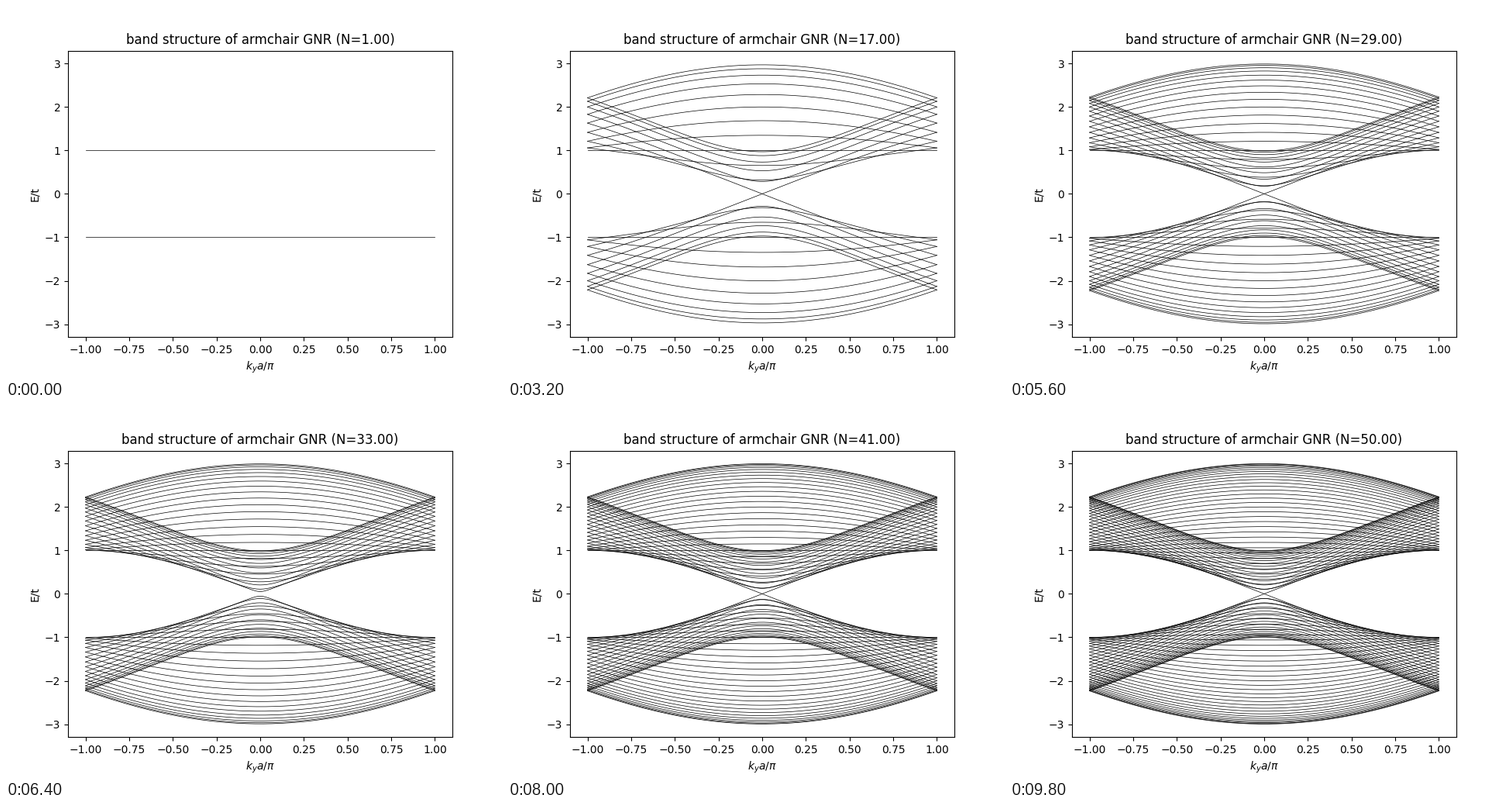
A matplotlib script for the animation above (10000 ms loop, 640 px wide and 480 px high).

```python
import numpy as np
import matplotlib.pyplot as plt
from matplotlib.animation import FuncAnimation

N_MAX = 50
INTERVAL = 200

k = np.linspace(-1, 1, 201)


def bands(n):
    """Positive energies of an armchair ribbon with n dimer lines, one row per band."""
    c = np.cos(np.arange(1, n + 1) * np.pi / (n + 1))[:, None]
    return np.sqrt(np.abs(1 + 4 * c * np.cos(np.pi * k / 2) + 4 * c**2))


fig, ax = plt.subplots(figsize=(6.4, 4.8), dpi=100)
e_lim = 1.1 * bands(N_MAX).max()
ax.set_xlim(-1.1, 1.1)
ax.set_ylim(-e_lim, e_lim)
ax.set_xlabel(r"$k_y a/\pi$")
ax.set_ylabel("E/t")
title = ax.set_title("")
lines = [ax.plot([], [], color="black", lw=0.5)[0] for _ in range(2 * N_MAX)]


def update(i):
    n = i + 1
    energy = bands(n)
    curves = np.concatenate([energy, -energy])
    for j, line in enumerate(lines):
        line.set_visible(j < 2 * n)
        if j < 2 * n:
            line.set_data(k, curves[j])
    title.set_text(f"band structure of armchair GNR (N={n:.2f})")
    return [*lines, title]


anim = FuncAnimation(fig, update, frames=N_MAX, init_func=lambda: update(0),
                     interval=INTERVAL, repeat=True, repeat_delay=0, blit=False)
plt.show()
```
